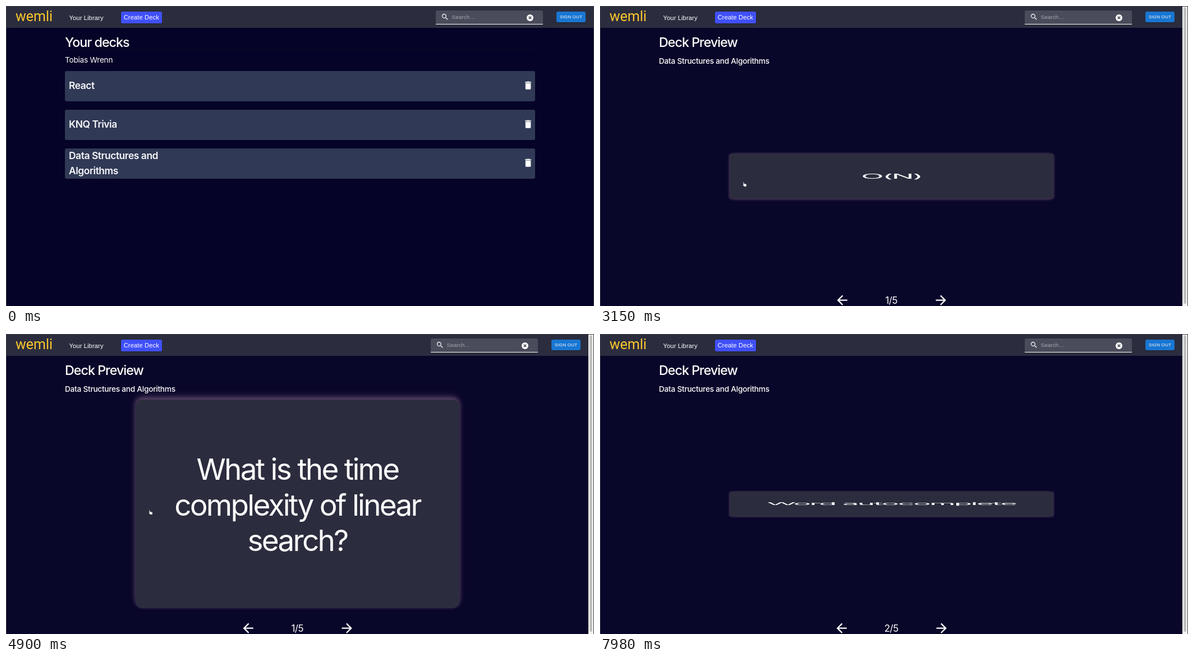
Recreate the animation shown at these times as an HTML page. Size 1048x535 px, loop 8 s.

```html
<!DOCTYPE html>
<html lang="en">
<head>
<meta charset="utf-8">
<title>Flashcards</title>
<style>
  html, body { margin: 0; width: 100%; height: 100%; overflow: hidden; }
  body { position: relative; background: #050327; color: #fff;
    font: 13.7px Inter, sans-serif; font-optical-sizing: none; }
  div, span, svg { position: absolute; }
  svg { overflow: visible; fill: currentColor; }
  span { line-height: 0; white-space: nowrap; }
  .mid { transform: translateX(-50%); }
  .ui { font-family: "Liberation Sans", Arial, sans-serif; font-size: 11.2px; letter-spacing: .1px; }
  #edge { inset: 0; border: 1px solid #3d3d48; border-bottom: 0; box-sizing: border-box; }
  #bar { left: 0; top: 1px; width: 100%; height: 38px; background: #2b2d3e; }
  #logo { left: 17px; top: 19px; font: 25px/0 Roboto, sans-serif; color: #fcc62d; }
  #create { left: 205px; top: 10px; width: 72.5px; height: 21px; border-radius: 2.5px; background: #4050fa; }
  #create, #signout { box-shadow: 0 1px 2px rgba(0,0,0,.25); }
  #tools { left: 0; top: 0; }
  #search { left: 766px; top: 8px; width: 191px; height: 24px; background: #4a4c5b;
    border-bottom: 1px solid #fff; border-radius: 3px 3px 0 0; }
  #signout { left: 981px; top: 10px; width: 52px; height: 19px; border-radius: 3px; background: #1976d2; }
  .head { left: 105px; top: 64.5px; font-size: 23.3px; font-weight: 550; letter-spacing: -.043em; }
  .sub { left: 105px; letter-spacing: -.02em; }
  .deck { left: 105px; width: 837.5px; height: 54px; border-radius: 3px; background: #303955; }
  .deck span { left: 7px; font-size: 17.4px; font-weight: 600; letter-spacing: -.025em; color: #f7f7fa; }
  .deck svg { left: 815.6px; top: 16px; }
  #rule { left: 105px; top: 77px; width: 838px; height: 1px; background: #0c0a22; }
  #card { width: 577px; height: 374px; border-radius: 12px; background: #2b2d3e;
    box-shadow: 0 -3px 9px rgba(200,150,180,.43), 0 -9px 15px rgba(140,100,140,.2); }
  #words { inset: 0; display: flex; align-items: center; justify-content: center; text-align: center;
    padding-top: 5px; font-size: 53px; line-height: 1.2; letter-spacing: -.051em; white-space: pre; }
  #count { font-size: 17px; letter-spacing: -.03em; }
  #scroll { right: 1px; top: 0; width: 9px; height: 100%; background: #f6f6f6; }
  #scroll div { left: 2px; top: 2px; width: 5px; height: 529px; border-radius: 3px; background: #c2c2c2; }
</style>
</head>
<body>
<div id="bar"></div>
<span id="logo">wemli</span>
<span class="ui" style="left:112.5px;top:20.5px">Your Library</span>
<div id="create"></div>
<span class="ui mid" style="left:241.3px;top:20px">Create Deck</span>

<div id="tools">
  <div id="search"></div>
  <svg style="left:774.5px;top:12px" width="15" height="15" viewBox="0 0 24 24"><path d="M15.5 14h-.8l-.3-.3A6.5 6.5 0 1 0 13.7 14.4l.3.3v.8l5 5 1.5-1.5zM9.5 14a4.5 4.5 0 1 1 0-9 4.5 4.5 0 0 1 0 9z"/></svg>
  <span class="ui" style="left:794.5px;top:20px;font-size:9.9px;color:#a6a7af">Search…</span>
  <svg style="left:934px;top:20.5px" width="1" height="1"><circle r="6"/><path d="M-2.3-2.3 2.3 2.3M2.3-2.3-2.3 2.3" stroke="#3a3c4b" stroke-width="1.4"/></svg>
  <div id="signout"></div>
  <span class="ui mid" style="left:1007.2px;top:19.5px;font-size:7.9px;letter-spacing:.25px">SIGN OUT</span>
</div>

<div id="list">
  <span class="head">Your decks</span>
  <div id="rule"></div>
  <span class="sub" style="top:95.5px">Tobias Wrenn</span>
</div>

<div id="preview">
  <span class="head">Deck Preview</span>
  <svg id="spinner" style="left:114px;top:98.5px" width="1" height="1"><circle r="8.5" fill="none" stroke="#fff" stroke-width="2.2" stroke-dasharray="38.6 14.81"/></svg>
  <span class="sub" id="title" style="top:98px;font-weight:550">Data Structures and Algorithms</span>
  <div id="card"><div id="words"></div></div>
  <svg id="prev" width="27.4" height="27.4" viewBox="0 0 24 24"><path d="M20 11H7.83l5.59-5.59L12 4l-8 8 8 8 1.41-1.41L7.83 13H20z"/></svg>
  <span id="count" class="mid"></span>
  <svg id="next" width="27.4" height="27.4" viewBox="0 0 24 24"><path d="M12 4l-1.41 1.41L16.17 11H4v2h12.17l-5.58 5.59L12 20l8-8z"/></svg>
  <svg id="hand" style="left:252.5px;top:313px" width="9" height="10" viewBox="0 0 9 10"><path d="M1.800 1.200q1-1 1.600.2l.6 2.200 3.200.7q1.300.4 1.200 1.700l-.5 3.300H4.200L1 6.200q-.3-1 1.400-.4z" stroke="#111" stroke-width=".7"/></svg>
</div>
<div id="scroll"><div></div></div>
<div id="edge"></div>

<script>
const $ = id => document.getElementById(id);
const LOOP = 8000, OPEN = 1680, LOADED = 1890, NEXT = 6370, FLIP = 880;
const flips = [2861, 4220, 7706];
const cards = [
  ["What is the time\ncomplexity of linear\nsearch?", "O(N)"],
  ["What can I use a trie for?", "Word autocomplete"]
];

const trash = '<svg width="19.2" height="19.2" viewBox="0 0 24 24"><path d="M6 19c0 1.1.9 2 2 2h8c1.1 0 2-.9 2-2V7H6zM19 4h-3.5l-1-1h-5l-1 1H5v2h14z"/></svg>';
[["React"], ["KNQ Trivia"], ["Data Structures and", "Algorithms"]].forEach((lines, i) => {
  const first = lines.length > 1 ? 12.5 : 26;
  const text = lines.map((s, k) => `<span style="top:${first + 27 * k}px">${s}</span>`).join("");
  $("list").insertAdjacentHTML("beforeend",
    `<div class="deck" style="top:${116 + 69 * i}px">${text}${trash}</div>`);
});

// CSS "ease": cubic-bezier(.25, .1, .25, 1)
function ease(x) {
  if (x <= 0) return 0;
  if (x >= 1) return 1;
  let lo = 0, hi = 1, u;
  for (let i = 0; i < 24; i++) {
    u = (lo + hi) / 2;
    if (.75 * u * (1 - u) + u ** 3 < x) lo = u; else hi = u;
  }
  return .3 * u * (1 - u) ** 2 + 3 * u * u * (1 - u) + u ** 3;
}

const show = (id, on) => $(id).style.display = on ? "" : "none";
const place = (id, x, y) => { $(id).style.left = x + "px"; $(id).style.top = y + "px"; };

function draw(t) {
  const open = t >= OPEN, loaded = t >= LOADED, second = t >= NEXT;
  show("list", !open);
  show("preview", open);
  show("spinner", !loaded);
  show("title", loaded);
  show("scroll", loaded);
  show("hand", t >= 2940 && t < 5110);
  document.body.style.background = loaded ? "#080629" : "#050327";
  $("tools").style.transform = loaded ? "translateX(-9px)" : "";
  $("spinner").style.transform = `rotate(${60 + (t - OPEN) / 1400 * 360}deg)`;

  const turn = flips.reduce((a, start, i) => a + (i % 2 ? -1 : 1) * ease((t - start) / FLIP), 0);
  const back = flips.filter(start => t >= start).length % 2;
  const mid = loaded ? 519.5 : 524, y = loaded ? 303 : 295;
  place("card", mid - 288.5, y - 187);
  $("card").style.transform = `scaleY(${Math.cos(Math.PI * turn)})`;
  $("words").style.transform = back ? "scaleY(-1)" : "";
  $("words").textContent = loaded ? cards[+second][back] : "";

  const gap = second ? 88.7 : 87.7, row = y + 221.5;
  $("count").textContent = second ? "2/5" : loaded ? "1/5" : "1/0";
  place("count", mid - .3, row + .5);
  place("prev", mid - gap - 13.7, row - 13.9);
  place("next", mid + gap - 13.7, row - 13.9);
  $("next").style.color = t >= 5600 && t < 6930 ? "#e0a03c" : "#fff";
}

function tick() {
  draw(performance.now() % LOOP);
  requestAnimationFrame(tick);
}
tick();
</script>
</body>
</html>
```
